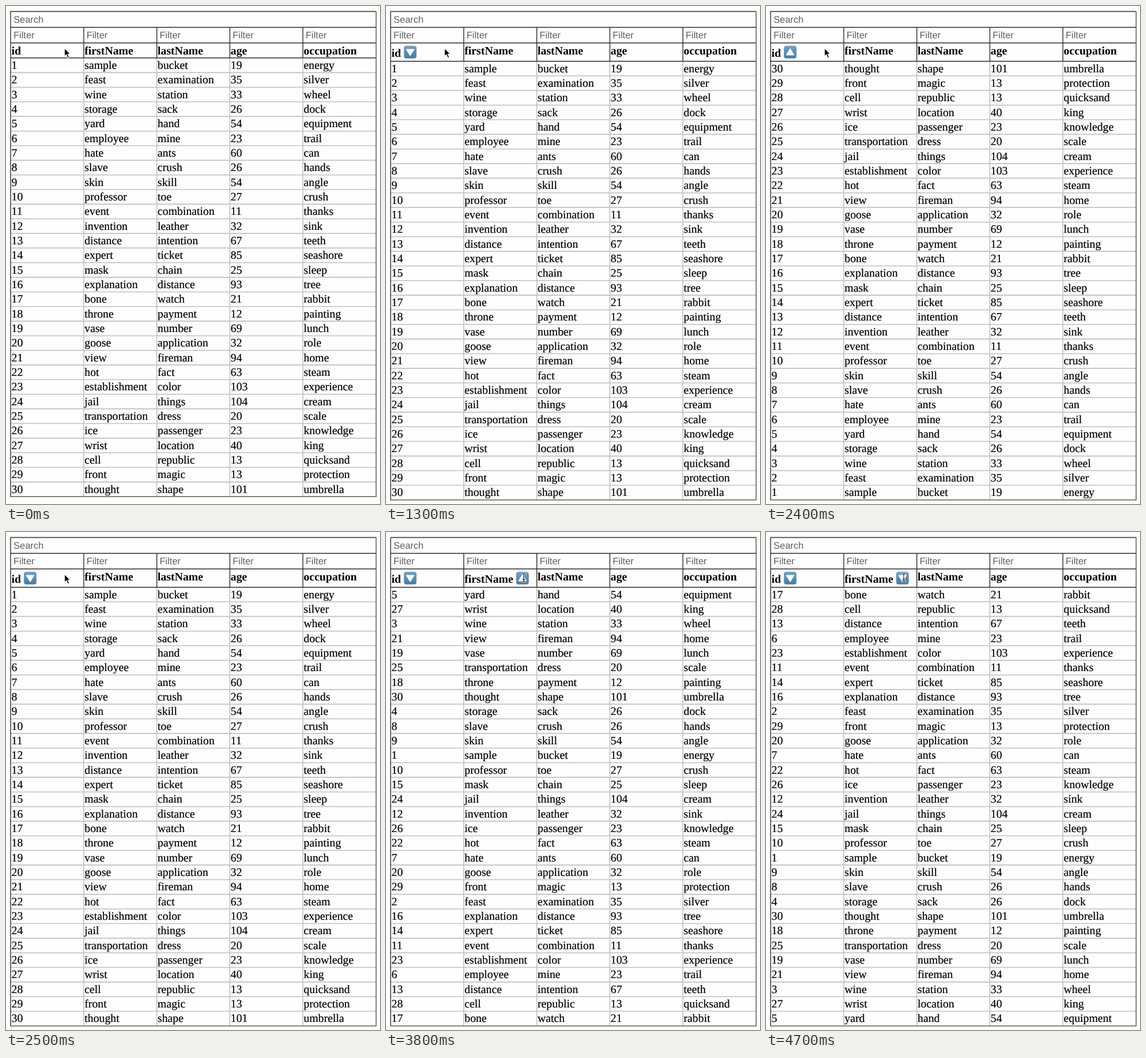
An HTML page for the animation above (5 s loop, 649x863 px).

```html
<!DOCTYPE html>
<html lang="en">
<head>
<meta charset="utf-8">
<title>Sortable table</title>
<style>
  html, body { margin: 0; width: 100%; height: 100%; overflow: hidden; background: #fefefe; }
  svg { display: block; width: 649px; height: 863px; }
  text {
    font: 19.8px "Liberation Serif", Times, serif;
    font-variant-ligatures: none;
    fill: #000; stroke: #000; stroke-width: .2;
    text-rendering: geometricPrecision;
  }
  .head { font-weight: bold; stroke: none; }
  .hint { font: 16.5px "Liberation Sans", Arial, sans-serif; fill: #606060; stroke: none; }
  .dark { stroke: #2b2b2b; stroke-width: 1.4; }
  .edge { stroke: #5c5c5c; stroke-width: 1.5; }
  .pale { stroke: #c0c0c0; stroke-width: 1.6; }
</style>
</head>
<body>
<svg id="stage" viewBox="0 0 649 863">
  <defs>
    <linearGradient id="blue" x1="0" y1="0" x2="0" y2="1">
      <stop offset="0" stop-color="#6fa3c4"/>
      <stop offset="1" stop-color="#447ba3"/>
    </linearGradient>
  </defs>
  <g id="table"></g>
  <g id="arrow">
    <path d="M0 0V14.2L3.3 11.2L5.8 17L8.3 15.9L5.8 10.3H10.2Z" fill="#000" stroke="#fff" stroke-width="1.1" stroke-linejoin="round"/>
  </g>
  <g id="beam" fill="none" stroke-linecap="round">
    <path d="M-3 -7Q0 -7 0 -5Q0 -7 3 -7M0 -5V5M-3 7Q0 7 0 5Q0 7 3 7M-1.6 3H1.6" stroke="#fff" stroke-width="2.8"/>
    <path d="M-3 -7Q0 -7 0 -5Q0 -7 3 -7M0 -5V5M-3 7Q0 7 0 5Q0 7 3 7M-1.6 3H1.6" stroke="#333" stroke-width="1.3"/>
  </g>
</svg>
<script>
const LOOP = 5000, STEP = 100;
const LEFT = 8, RIGHT = 642.3, COL = 126.75, ROW = 25.34;
const TOP = 9.5, FILTERS = 37, HEADER = 64;
const heads = ['id', 'firstName', 'lastName', 'age', 'occupation'];

const people = `sample bucket 19 energy
feast examination 35 silver
wine station 33 wheel
storage sack 26 dock
yard hand 54 equipment
employee mine 23 trail
hate ants 60 can
slave crush 26 hands
skin skill 54 angle
professor toe 27 crush
event combination 11 thanks
invention leather 32 sink
distance intention 67 teeth
expert ticket 85 seashore
mask chain 25 sleep
explanation distance 93 tree
bone watch 21 rabbit
throne payment 12 painting
vase number 69 lunch
goose application 32 role
view fireman 94 home
hot fact 63 steam
establishment color 103 experience
jail things 104 cream
transportation dress 20 scale
ice passenger 23 knowledge
wrist location 40 king
cell republic 13 quicksand
front magic 13 protection
thought shape 101 umbrella`.split('\n').map((line, i) => [i + 1, ...line.split(' ')]);

const byId = (a, b) => a[0] - b[0];
const byName = (a, b) => a[1] < b[1] ? -1 : 1;

// Each state: start time, order, direction, arrows shown beside the headings
const states = [
  { at: 0, order: byId, dir: 1, icons: [] },
  { at: 300, order: byId, dir: 1, icons: [1] },
  { at: 1700, order: byId, dir: -1, icons: [-1] },
  { at: 2500, order: byId, dir: 1, icons: [1] },
  { at: 3800, order: byName, dir: -1, icons: [1, -1] },
  { at: 4500, order: byName, dir: 1, icons: [1, 1] }
];

const $ = id => document.getElementById(id);
const colX = i => LEFT + i * COL;
const text = (x, y, s, cls = '') => `<text x="${x}" y="${y}" class="${cls}">${s}</text>`;
const line = (x1, y1, x2, y2, cls) => `<path d="M${x1} ${y1}L${x2} ${y2}" class="${cls}"/>`;

function icon(x, y, dir) {
  return `<g transform="translate(${x} ${y})">
    <rect x="-10.6" y="-10.6" width="21.2" height="21.2" rx="3.6" fill="url(#blue)" stroke="#6c93ad" stroke-width=".8"/>
    <path d="M-6.6 -4.8H6.6L0 6Z" transform="scale(1 ${dir})" fill="#fff" stroke="#fff" stroke-width="1.2" stroke-linejoin="round"/>
  </g>`;
}

function drawTable({ order, dir, icons }) {
  const body = icons.length ? 95.7 : 90;
  const bottom = body + ROW * people.length;
  const rows = [...people].sort((a, b) => dir * order(a, b));
  let out = '';

  for (let i = 1; i < rows.length; i++) out += line(LEFT, body + i * ROW, RIGHT, body + i * ROW, 'pale');
  for (let i = 1; i < heads.length; i++) {
    const x = colX(i) + .2;
    out += line(x, body, x, bottom, 'pale') + line(x, FILTERS, x, body, 'dark');
  }
  for (const y of [TOP, FILTERS, HEADER, body]) out += line(LEFT, y, RIGHT, y, 'dark');
  out += line(LEFT, TOP, LEFT, bottom, 'dark') + line(RIGHT, TOP, RIGHT, bottom, 'edge');
  out += line(LEFT - .7, bottom, RIGHT + .7, bottom, 'edge');

  out += text(13, 28.9, 'Search', 'hint');
  heads.forEach((name, i) => {
    out += text(colX(i) + 4.9, 56.4, 'Filter', 'hint');
    out += text(colX(i) + 1.5, icons[i] ? 87.6 : 83.9, name, 'head');
  });
  icons.forEach((d, i) => out += icon([42, 236.8][i], 80, d));

  rows.forEach((row, r) => row.forEach((cell, c) => {
    out += text(colX(c) + 1.5, body + r * ROW + 18.9, cell);
  }));
  $('table').innerHTML = out;
}

const ease = (t, from, to) => {
  const p = Math.min(1, Math.max(0, (t - from) / (to - from)));
  return p * p * (3 - 2 * p);
};

function drawPointer(t) {
  const a = ease(t, 2800, 3200), b = ease(t, 3300, 3700);
  const x = 101.5 + 134.5 * a + 3 * b;
  const y = 73 - 15 * a + 21 * b;
  const typing = x > colX(1);
  $('arrow').style.display = typing ? 'none' : '';
  $('beam').style.display = typing ? '' : 'none';
  $(typing ? 'beam' : 'arrow').setAttribute('transform', `translate(${x} ${y})`);
}

let shown = null;
const start = performance.now();

function frame() {
  const elapsed = Math.max(0, performance.now() - start) % LOOP;
  const t = Math.floor(elapsed / STEP) * STEP;
  const state = states.filter(s => s.at <= t).pop();
  if (state !== shown) drawTable(shown = state);
  drawPointer(t);
  requestAnimationFrame(frame);
}
frame();
</script>
</body>
</html>
```
